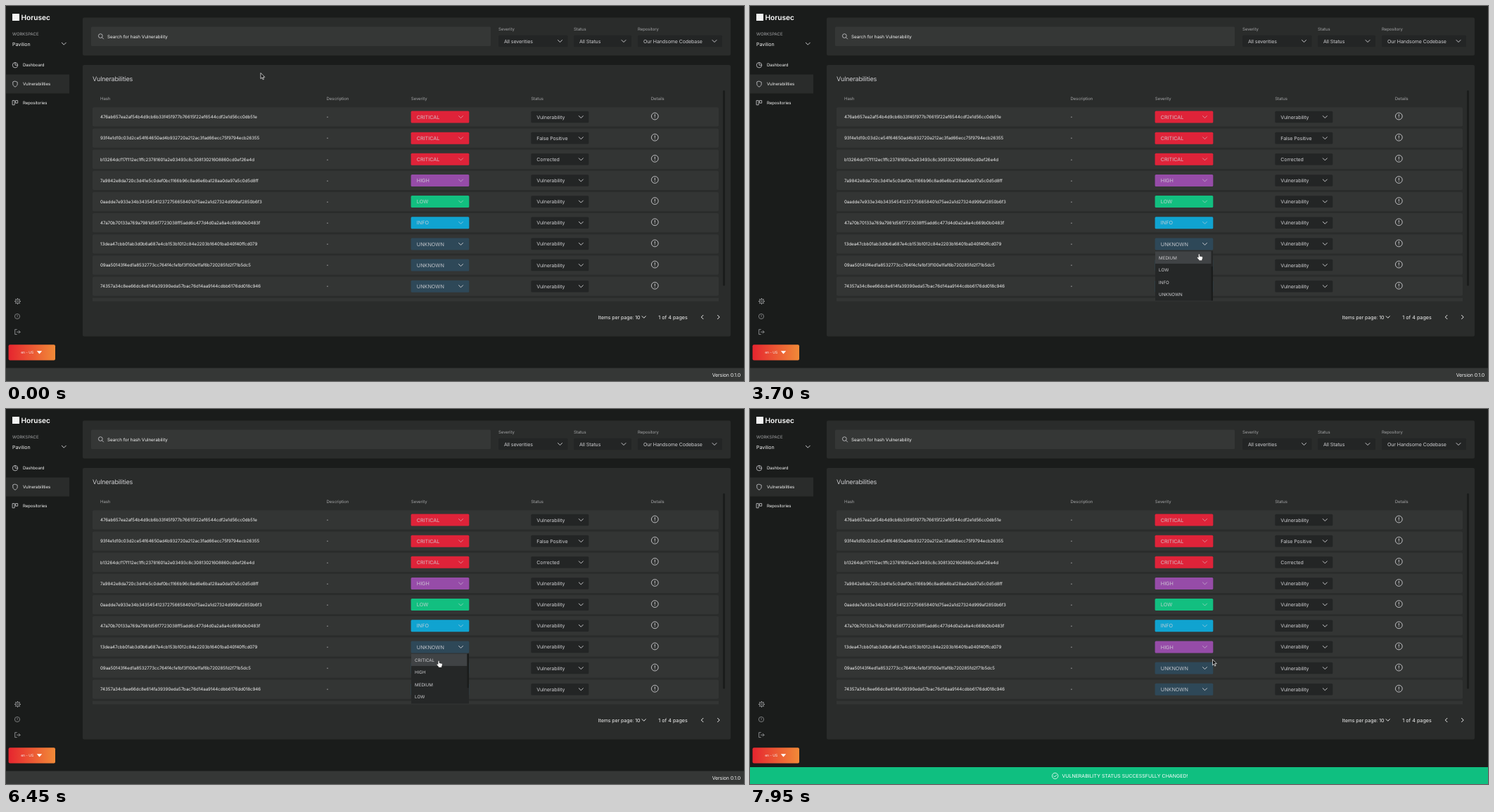
Animation of 1049x534 px, one loop 8 s. Source, as an HTML page:

```html
<!DOCTYPE html>
<html lang="en">
<head>
<meta charset="utf-8">
<title>Vulnerabilities</title>
<style>
html, body { margin: 0; width: 100%; height: 100%; overflow: hidden; background: #1a1c1b; }
svg { display: block; }
#stage { width: 1049px; height: 534px; }
text { font-family: Inter, "Open Sans", sans-serif; text-rendering: geometricPrecision; white-space: pre; }
</style>
</head>
<body>
<svg id="stage" viewBox="0 0 1049 534" xmlns="http://www.w3.org/2000/svg"></svg>
<script>
const LOOP = 8000, STEP = 50;
const C = {
  panel: '#2a2c2b', row: '#333534', field: '#353736', select: '#232525', menu: '#252727', hover: '#404345',
  white: '#f4f4f4', text: '#cfcfd2', grey: '#a3a4a6', dark: '#1a1c1b', green: '#0fbf80'
};
const SEVERITY = {
  CRITICAL: '#df2339', HIGH: '#964ca8', LOW: '#12bf80', INFO: '#10a3d0', UNKNOWN: '#2e4858'
};
const LEVELS = ['CRITICAL', 'HIGH', 'MEDIUM', 'LOW', 'INFO', 'UNKNOWN'];
const ROWS = [
  ['476ab657ea2af54b4d9cb6b33f45f977b76615f22ef6544cdf2e1d56cc0db51e', 'CRITICAL', 'Vulnerability'],
  ['93f4e1d10c03d2ce54f64650ad4b932720a212ac3fad66ecc75f9794ecb26355', 'CRITICAL', 'False Positive'],
  ['b13264dcf17f112ec1ffc23781601a2e03493c8c30813021608860cd0ef26e4d', 'CRITICAL', 'Corrected'],
  ['7a9842e8da720c3d41e5c0def0bc1166b96c8ad6e6ba128aa0da97a5c0d5d8ff', 'HIGH', 'Vulnerability'],
  ['0aadde7e933e34b343545412372756658401d75ae2a1d27324d999af2850b6f3', 'LOW', 'Vulnerability'],
  ['47a70b70133a769a7981d56f7723038ff5add6c477d4d0a2a8a4c669b0b0483f', 'INFO', 'Vulnerability'],
  ['13dea47cbb01ab3d0b6a687e4cb153b1012c84e2203b16401ba040f40ffcd079', 'UNKNOWN', 'Vulnerability'],
  ['09aa50143f4ed1a8532773cc764f4cfe1bf3f100e1faf6b720285fd2f71b5dc5', 'UNKNOWN', 'Vulnerability'],
  ['74357a34c8ee66dc8e614fa39390eda57bac76d14aa9144cdbb6176dd018c946', 'UNKNOWN', 'Vulnerability']
];
const PITCH = 30.15, ACTIVE = 6;
const MENU = { x: 576, y: 348.3, w: 82, h: 71.4, item: 17.6, scroll: 34.2, thumb: 49 };

// Shape helpers return markup; y of a label is its vertical centre.
const rect = (x, y, w, h, fill, r = 0, extra = '') =>
  `<rect x="${x}" y="${y}" width="${w}" height="${h}" rx="${r}" fill="${fill}" ${extra}/>`;
const label = (x, y, size, str, fill = C.white, track = 0, extra = '') =>
  `<text x="${x}" y="${y + size * 0.364}" font-size="${size}" fill="${fill}" letter-spacing="${track}" ${extra}>${str}</text>`;
const line = (d, stroke = C.white, w = 0.8) =>
  `<path d="${d}" fill="none" stroke="${stroke}" stroke-width="${w}" stroke-linecap="round" stroke-linejoin="round"/>`;
const ring = (x, y, r, stroke = C.text, w = 0.8) =>
  `<circle cx="${x}" cy="${y}" r="${r}" fill="none" stroke="${stroke}" stroke-width="${w}"/>`;
const chevron = (x, y, stroke = C.text, s = 3) => line(`M${x - s} ${y - s / 2}l${s} ${s}l${s} ${-s}`, stroke, 0.95);
const select = (x, y, w, str, h = 16.6) =>
  rect(x, y - h / 2, w, h, C.select, 1.5) + label(x + 8, y, 7, str, C.text, -0.08) + chevron(x + w - 11, y);

function sidebar() {
  const item = (y, str) => label(24, y, 6, str, C.white, -0.06);
  const teeth = Array.from({ length: 8 }, (_, i) => {
    const a = i * Math.PI / 4, c = Math.cos(a), s = Math.sin(a);
    return `M${16.5 + 3.2 * c} ${420.5 + 3.2 * s}L${16.5 + 4 * c} ${420.5 + 4 * s}`;
  }).join('');
  return rect(9, 11, 10, 10, '#f4f4f4') +
    label(21.4, 15.8, 10.2, 'Horusec', '#fff', 0, 'font-weight="600"') +
    label(9, 39.5, 6, 'WORKSPACE', C.grey) + label(9, 54, 7, 'Pavilion', C.white) + chevron(82.3, 53.7) +
    rect(0, 97.5, 90, 27, C.panel) +
    item(84.3, 'Dashboard') + item(111.2, 'Vulnerabilities') + item(137.6, 'Repositories') +
    ring(13, 84.2, 3.7) + line('M13 80.5V84.2H16.7', C.text) +
    line('M13 107.2L16.2 108.4V111C16.2 113 15 114.3 13 115.2C11 114.3 9.8 113 9.8 111V108.4Z', C.text) +
    line('M9.5 134.6h2.7v6.2h-2.7zM14 134.6h2.7v3.6h-2.7z', C.text) +
    ring(16.5, 420.5, 3.3, C.grey, 0.7) + ring(16.5, 420.5, 1.3, C.grey, 0.7) + line(teeth, C.grey, 1) +
    ring(16, 442, 3.6, C.grey, 0.7) + label(16, 442.1, 5, '?', C.grey, 0, 'text-anchor="middle"') +
    line('M15.3 460.7H12.7V467.6H15.3M15.5 464.2H20M18.2 462.3L20.1 464.2L18.2 466.1', C.grey) +
    rect(3.6, 482.2, 66.4, 22.4, 'url(#lang)', 2) + label(21.2, 493.6, 5, 'en - US') +
    '<path d="M43.8 491.3h7.4l-3.7 4.2z" fill="#fff"/>';
}

function filters() {
  const filter = (x, w, name, value) => label(x, 32.4, 6, name, C.grey, -0.05) + select(x, 50, w, value);
  return rect(109, 16.5, 921, 54, C.panel, 2) + rect(121, 29.5, 568, 27.5, C.field, 1.5) +
    ring(134.3, 42.6, 2.9) + line('M136.5 44.8L138.6 46.9', C.text) +
    label(144, 43.3, 6.3, 'Search for hash Vulnerability') +
    filter(700, 98.5, 'Severity', 'All severities') + filter(807, 82, 'Status', 'All Status') +
    filter(898, 120, 'Repository', 'Our Handsome Codebase');
}

function badge(y, level) {
  return rect(575.6, y - 8.5, 82.7, 17, SEVERITY[level], 1.5) +
    label(583.8, y, 7.2, level, '#d3d3d8', 0, 'opacity=".88"') +
    chevron(646.5, y, level === 'UNKNOWN' ? C.text : 'rgba(215,215,220,.6)');
}

function table() {
  const heads = [[134, 'Hash'], [455.6, 'Description'], [575.8, 'Severity'], [746.3, 'Status'], [916.8, 'Details']];
  const rows = ROWS.map(([hash, level, status], i) => {
    const y = 158 + PITCH * i;
    return rect(123, y - 13.7, 890, 27.3, C.row, 2) + label(134, y, 6.2, hash, C.white, -0.04) +
      label(455.6, y, 6.2, '-') + `<g id="badge${i}">${badge(y, level)}</g>` + select(746.3, y, 82, status) +
      ring(922.3, y - 1, 4.9, C.text, 0.9) + line(`M922.3 ${y - 3.5}v2.8M922.3 ${y + 1.1}v.1`, C.text, 0.95);
  }).join('');
  return rect(109, 84, 921, 386.5, C.panel, 2) + label(123, 103.7, 9, 'Vulnerabilities', C.text, -0.18) +
    heads.map(([x, str]) => label(x, 132.2, 6, str, C.grey, -0.06)).join('') + rows +
    rect(123, 415.6, 890, 5, C.row) + rect(1019, 120, 3, 278.5, C.dark, 1.5) +
    label(841.7, 443.3, 7, 'Items per page: 10', C.white, -0.07) + chevron(906.7, 443, C.white, 2.6) +
    label(927.3, 443.7, 7.2, '1 of 4 pages') +
    line('M991 440.3L988.3 443L991 445.7M1011.5 440.3L1014.2 443L1011.5 445.7', C.white, 0.95);
}

const stage = document.getElementById('stage');
stage.innerHTML =
  `<defs><linearGradient id="lang"><stop stop-color="#e6252f"/><stop offset="1" stop-color="#f18a38"/></linearGradient></defs>` +
  rect(0, 0, 1049, 534, C.dark) + sidebar() + filters() + table() +
  rect(0, 515.5, 1049, 18.5, C.field) + label(1044, 525.1, 7, 'Version 0.1.0', C.white, -0.1, 'text-anchor="end"') +
  `<svg id="menu" x="${MENU.x}" y="${MENU.y}" width="${MENU.w}" height="0" overflow="hidden">` +
    rect(0, 0, MENU.w, MENU.h, C.menu) + `<g id="list">` +
    rect(0, 0, 79.5, MENU.item, C.hover, 0, 'id="hover"') +
    LEVELS.map((s, i) => label(5.1, MENU.item * (i + 0.5) + 0.2, 6.2, s, C.text)).join('') + '</g>' +
    rect(79.5, 0, 2.5, MENU.thumb, C.dark, 1, 'id="thumb"') + '</svg>' +
  `<g id="toast">` + rect(0, 510, 1049, 24.5, C.green) + ring(433.7, 522.5, 4.2, '#fff') +
    line('M431.8 522.6l1.4 1.4l2.5-2.8', '#fff') +
    label(443.4, 522.6, 7, 'VULNERABILITY STATUS SUCCESSFULLY CHANGED!', '#fff') + '</g>' +
  `<path id="arrow" d="M.5 .3V8.6L2.4 6.8L3.7 9.8L5 9.2L3.7 6.3H6.3Z" fill="#111" stroke="#fff" stroke-width=".7" stroke-linejoin="round"/>` +
  `<path id="hand" d="M2.1 5.2V1.1Q2.1 .1 3 .1T3.9 1.1V3.4Q4.8 2.9 5.3 3.6Q6.1 3.2 6.7 3.9Q8.1 3.6 8.2 5.1Q8.2 7 7.3 8.1V9.5H2.8V8.5Q1.6 7.3 .2 5.5Q.2 4.1 1.4 4.6Z" fill="#fff" stroke="#111" stroke-width=".4" stroke-linejoin="round"/>`;

// Pointer moves: first step, last step, then the place reached.
const START = [361.5, 95];
const MOVES = [
  [800, 800, 394.5, 90.5], [950, 1000, 587, 111], [1200, 1200, 702, 166], [1400, 1400, 708, 230],
  [1600, 1600, 689.5, 297], [1800, 2050, 645.2, 340.7], [2300, 2300, 644.6, 340.5], [2450, 2550, 645.2, 339.6],
  [3500, 3700, 635.3, 353], [3750, 3900, 626.8, 357.5], [4050, 4100, 625, 359.5], [4400, 4400, 623, 361.8],
  [4600, 4700, 622.3, 363.2], [5000, 5000, 625.3, 364.5], [5300, 5750, 624.6, 371.5], [5950, 5950, 623, 371.2],
  [6150, 6450, 612, 358.5], [6850, 7050, 604.6, 370.5], [7550, 7650, 611, 367.5], [7700, 7950, 657, 356.3]
];

const $ = id => document.getElementById(id);
const clamp = v => Math.max(0, Math.min(1, v));
const ease = (t, from, to) => { const p = clamp((t - from) / (to - from)); return p * p * (3 - 2 * p); };
const show = (id, on) => $(id).setAttribute('visibility', on ? 'visible' : 'hidden');
const shift = (id, x, y) => $(id).setAttribute('transform', `translate(${x} ${y})`);

function pointer(t) {
  let [x, y] = START;
  for (const [from, to, tx, ty] of MOVES) {
    const p = clamp((t - from + STEP) / (to - from + STEP));
    x += (tx - x) * p;
    y += (ty - y) * p;
  }
  return [x, y];
}

let changed = null;
function setChanged(on) {
  if (on === changed) return;
  changed = on;
  $('badge' + ACTIVE).innerHTML = badge(158 + PITCH * ACTIVE, on ? 'HIGH' : 'UNKNOWN');
}

function draw(ms) {
  const t = Math.floor((ms % LOOP + 0.5) / STEP) * STEP;
  const [x, y] = pointer(t);

  const height = MENU.h * (ease(t, 2650, 3200) - ease(t, 7360, 7860));
  const scrolled = 1 - ease(t, 5250, 5750), scroll = MENU.scroll * scrolled;
  $('menu').setAttribute('height', Math.max(0, height));
  show('menu', height > 0.1);
  shift('list', 0, -scroll);
  shift('thumb', 0, scrolled * (MENU.h - MENU.thumb));

  const over = t >= 7600 ? 0 : Math.floor((y - MENU.y + scroll) / MENU.item);
  $('hover').setAttribute('y', over * MENU.item);
  $('hover').setAttribute('visibility', y > MENU.y && height > 0.1 ? 'inherit' : 'hidden');

  setChanged(t >= 7450);
  shift('toast', 0, 24.5 * (1 - ease(t, 7442, 7942)));

  const hand = t >= 2000 && t < 7850;
  show('hand', hand);
  show('arrow', !hand);
  shift('hand', x, y);
  shift('arrow', x, y);
}

const begin = performance.now();
function frame() {
  draw(performance.now() - begin);
  requestAnimationFrame(frame);
}
frame();
</script>
</body>
</html>
```
